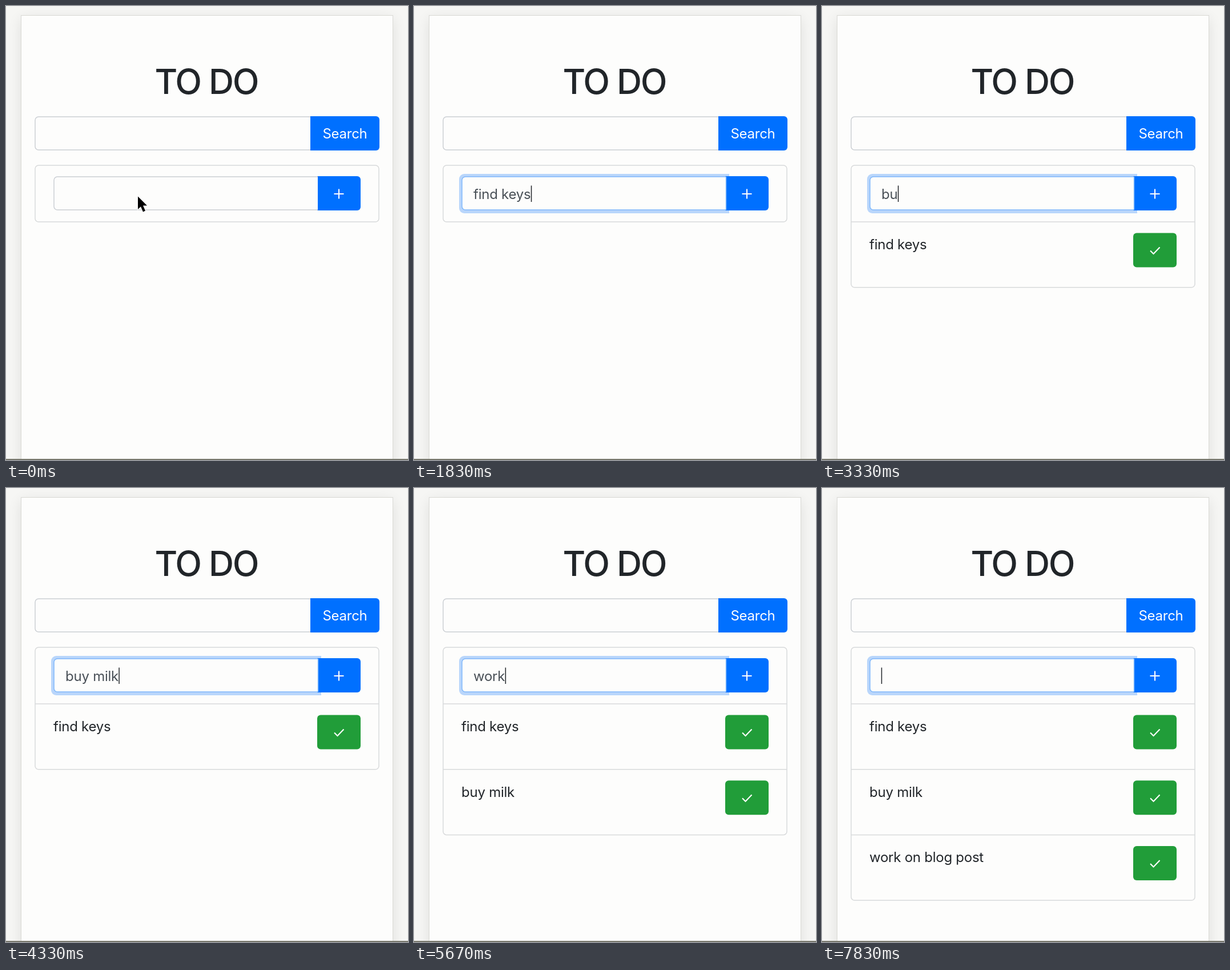
An HTML page that plays this animation: 704x795 px, repeating every 8 s.

```html
<!DOCTYPE html>
<html lang="en">
<head>
<meta charset="utf-8">
<title>To do</title>
<style>
html, body { margin: 0; width: 100%; height: 100%; overflow: hidden; background: #f6f6f4; }
svg { display: block; width: 100%; height: 100%; }
text { font: 24px Inter, Roboto, sans-serif; letter-spacing: -0.25px; fill: #212529; white-space: pre; }
.title { font-size: 61px; font-weight: 500; letter-spacing: -2.2px; text-anchor: middle; }
.search { fill: #fff; text-anchor: middle; }
.entry { fill: #495057; }
.line { fill: none; stroke: #d8dadb; stroke-width: 1.5; }
.field { fill: #fdfdfc; stroke: #cbcfd4; stroke-width: 1.5; }
.focus { stroke: #80b8fb; }
.blue { fill: #0070ff; }
.green { fill: #219d39; }
.icon { fill: none; stroke: #fff; stroke-width: 2.1; }
</style>
</head>
<body>
<svg viewBox="0 0 704 795">
  <defs>
    <filter id="soft" x="-10%" y="-10%" width="120%" height="120%"><feGaussianBlur stdDeviation="12"/></filter>
  </defs>
  <rect width="704" height="795" fill="#f6f6f4"/>
  <rect x="26" y="22" width="652" height="830" fill="#000" opacity=".09" filter="url(#soft)"/>
  <rect x="26.5" y="16.5" width="651" height="800" fill="#fdfdfc" stroke="#d9d9d4"/>
  <rect y="793" width="704" height="2" fill="#77776c"/>

  <text class="title" x="351" y="154">TO DO</text>
  <path class="field" d="M533 194H57a6 6 0 0 0-6 6v46a6 6 0 0 0 6 6H533"/>
  <path class="blue" d="M533 193h115a6 6 0 0 1 6 6v48a6 6 0 0 1-6 6H533z"/>
  <text class="search" x="593.5" y="232">Search</text>

  <rect id="panel" class="line" x="51" y="279" width="602" height="99" rx="6"/>
  <path id="ring" fill="#b9d6fb" d="M552 294H88a9 9 0 0 0-9 9v51a9 9 0 0 0 9 9H552z"/>
  <path class="blue" d="M545 298h70a6 6 0 0 1 6 6v48a6 6 0 0 1-6 6h-70z"/>
  <path class="icon" d="M574.5 329h17M583 320.5v17"/>
  <path id="field" class="field" d="M546 299H90a6 6 0 0 0-6 6v46a6 6 0 0 0 6 6H546"/>
  <path id="edge" class="field focus" d="M546.5 299v58"/>
  <text id="entry" class="entry" x="104" y="337.5"></text>
  <rect id="caret" y="314.5" width="1.5" height="28.5" fill="#212529"/>
  <g id="rows"></g>
  <path id="pointer" d="M231 333.5v22.5l5-4.8 4 9.2 4-1.8-4-9h7z" fill="#000" stroke="#fff" stroke-width="1.8" paint-order="stroke"/>
</svg>
<script>
const LOOP = 8000, FPS = 6, PITCH = 114.7, FOCUS = 330;
const tasks = [
  { text: "find keys", start: 600, step: 130, added: 2160 },
  { text: "buy milk", start: 2900, step: 165, added: 4660 },
  { text: "work on blog post", start: 5000, step: 135, added: 7825 }
];
const $ = id => document.getElementById(id);
const [panel, ring, field, edge, entry, caret, pointer] =
  ["panel", "ring", "field", "edge", "entry", "caret", "pointer"].map($);
const show = (el, on) => el.style.display = on ? "" : "none";

$("rows").innerHTML = tasks.map((task, i) => `
  <g transform="translate(0 ${i * PITCH})">
    <path class="line" d="M51 378H653"/>
    <text x="83" y="426">${task.text}</text>
    <rect class="green" x="545" y="397.5" width="76" height="60" rx="6"/>
    <path class="icon" d="M575 428.5l5.5 5.5L591.5 422.5"/>
  </g>`).join("");
const rows = [...$("rows").children];

function draw(time) {
  const t = Math.floor((time + 5) * FPS / 1000) * 1000 / FPS;
  const done = tasks.filter(task => t >= task.added).length;
  const task = tasks[done];
  const focused = t >= FOCUS;
  let count = 0, lastKey = done ? tasks[done - 1].added : FOCUS;

  if (task && t >= task.start) {
    count = Math.min(task.text.length, Math.floor((t - task.start) / task.step));
    lastKey = task.start + count * task.step;
  }

  rows.forEach((row, i) => show(row, i < done));
  panel.setAttribute("height", 99 + done * PITCH);
  entry.textContent = task ? task.text.slice(0, count) : "";
  caret.setAttribute("x", 103.7 + (count ? entry.getComputedTextLength() + 0.7 : 0));
  show(caret, focused && (t - lastKey) % 1000 < 510);
  show(ring, focused);
  show(edge, focused);
  field.classList.toggle("focus", focused);
  show(pointer, t < tasks[0].start);
}

function tick() {
  draw(performance.now() % LOOP);
  requestAnimationFrame(tick);
}
tick();
</script>
</body>
</html>
```
